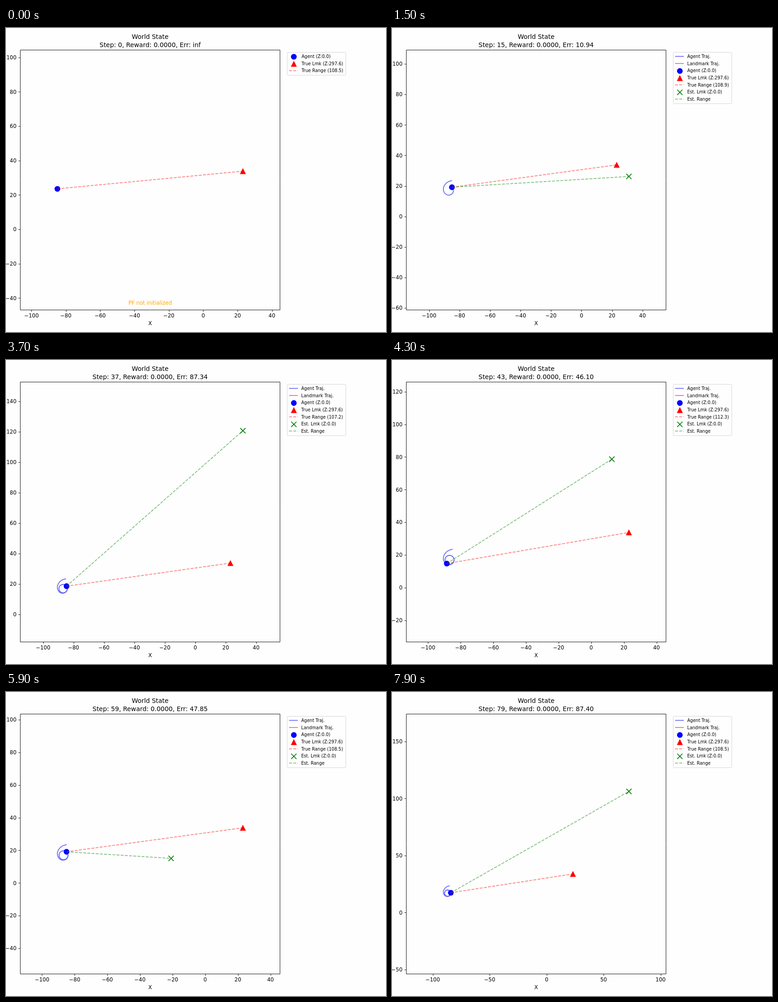
These frames come from a looping animation (837 px wide and 669 px high, 8000 ms). An HTML page with a canvas:

```html
<!DOCTYPE html>
<html lang="en">
<head>
<meta charset="utf-8">
<title>World State</title>
<style>
html, body { margin: 0; width: 100%; height: 100%; overflow: hidden; background: #fefefe; }
canvas { display: block; }
</style>
</head>
<body>
<canvas id="stage" width="837" height="669"></canvas>
<script>
const ctx = document.getElementById('stage').getContext('2d');
const STEPS = 80, STEP_MS = 100;
const BOX = { x: 31.5, y: 48.5, size: 572 };
const MID = { x: BOX.x + BOX.size / 2, y: BOX.y + BOX.size / 2 };
const LANDMARK = [23.1, 33.8];
const RED = 'rgba(255,0,0,.5)', GREEN = 'rgba(0,128,0,.5)';
const BLUE_PATH = 'rgba(0,0,255,.6)', RED_PATH = 'rgba(255,0,0,.6)';
const DASH = [6.4, 2.8];

// step, heading around the orbit centre in degrees
const TURN = [[0, 73.5], [3, 116], [6, 178], [10, 274], [15, 409], [27, 788],
  [37, 1116], [49, 1512], [68, 2152], [79, 2527]];
// step, estimate x, estimate y, error, measured range
const TRACK = [[0, 20, 24, 10.3, 108.5], [15, 31.1, 26.2, 10.94, 108.9],
  [27, 20.8, -9.9, 43.68, 111.5], [37, 31.3, 120.7, 87.34, 107.2],
  [49, -6, 36.6, 29.27, 109.7], [68, -34.3, -4.3, 68.93, 107.6],
  [79, 72.2, 106.2, 87.4, 108.5]];

function lerpKeys(keys, n, value) {
  const i = Math.max(1, keys.findIndex(k => k[0] >= n));
  const a = keys[i - 1], b = keys[i];
  const u = (n - a[0]) / (b[0] - a[0]);
  return value(a) * (1 - u) + value(b) * u;
}

const dist = (a, b) => Math.hypot(a[0] - b[0], a[1] - b[1]);

// A spiral that settles into a circle
function agentAt(n) {
  const deg = lerpKeys(TURN, n, k => k[1]), a = deg * Math.PI / 180;
  const r = 2.8 + 4 * Math.exp(-0.79 * (deg - 73.5) * Math.PI / 180);
  return [-86.85 + r * Math.cos(a), 17 + r * Math.sin(a)];
}

const path = Array.from({ length: STEPS }, (_, n) => agentAt(n));

function text(s, x, y, size, align = 'center', color = '#000') {
  ctx.font = `${size}px "DejaVu Sans", sans-serif`;
  ctx.textAlign = align;
  ctx.fillStyle = color;
  ctx.fillText(s, x, y);
}

function line(points, color, width = 1.74, dash = []) {
  ctx.beginPath();
  points.forEach(p => ctx.lineTo(...p));
  ctx.strokeStyle = color;
  ctx.lineWidth = width;
  ctx.lineJoin = 'round';
  ctx.setLineDash(dash);
  ctx.stroke();
  ctx.setLineDash([]);
}

function dot([x, y]) {
  ctx.beginPath();
  ctx.arc(x, y, 6.3, 0, 7);
  ctx.fillStyle = '#00f';
  ctx.fill();
}

function triangle([x, y]) {
  ctx.beginPath();
  ctx.moveTo(x, y - 6.7);
  ctx.lineTo(x + 6.6, y + 6.4);
  ctx.lineTo(x - 6.6, y + 6.4);
  ctx.fillStyle = '#f00';
  ctx.fill();
}

function cross([x, y]) {
  const d = 5.8;
  line([[x - d, y - d], [x + d, y + d]], '#008000');
  line([[x - d, y + d], [x + d, y - d]], '#008000');
}

function tickStep(span) {
  const raw = span / 9, mag = 10 ** Math.floor(Math.log10(raw));
  return mag * [1, 2, 2.5, 5, 10].find(m => m * mag >= raw);
}

function drawAxes(cx, cy, span, toX, toY) {
  const step = tickStep(span), half = span / 2;
  const bottom = BOX.y + BOX.size;
  const label = v => String(v).replace('-', '\u2212');
  for (let v = Math.ceil((cx - half) / step) * step; v <= cx + half; v += step) {
    const x = Math.round(toX(v)) + 0.5;
    line([[x, bottom], [x, bottom + 4]], '#000', 0.93);
    text(label(v), toX(v), 637, 11.57);
  }
  for (let v = Math.ceil((cy - half) / step) * step; v <= cy + half; v += step) {
    const y = Math.round(toY(v)) + 0.5;
    line([[BOX.x - 4, y], [BOX.x, y]], '#000', 0.93);
    text(label(v), 23, toY(v) + 4.3, 11.57, 'right');
  }
  ctx.strokeStyle = '#000';
  ctx.lineWidth = 0.93;
  ctx.strokeRect(BOX.x, BOX.y, BOX.size, BOX.size);
  text('X', MID.x, 654, 11.57);
}

function drawLegend(started, range) {
  const sample = (color, dash) => y => line([[623.5, y], [642.8, y]], color, 1.74, dash);
  const marker = draw => y => draw([634, y + 0.8]);
  const rows = [
    ['Agent (Z:0.0)', marker(dot)],
    ['True Lmk (Z:297.6)', marker(triangle)],
    [`True Range (${range.toFixed(1)})`, sample(RED, DASH)]
  ];
  if (started) {
    rows.unshift(['Agent Traj.', sample(BLUE_PATH)], ['Landmark Traj.', sample(RED_PATH)]);
    rows.push(['Est. Lmk (Z:0.0)', marker(cross)], ['Est. Range', sample(GREEN, DASH)]);
  }
  ctx.beginPath();
  ctx.roundRect(619.5, 53.5, 129, started ? 113 : 50.5, 2);
  ctx.strokeStyle = '#d6d6d6';
  ctx.lineWidth = 1;
  ctx.stroke();
  rows.forEach(([name, draw], i) => {
    const y = 62.5 + i * 15.65;
    draw(y);
    text(name, started ? 650.3 : 651, y + 3.6, 9.6, 'left');
  });
}

function draw(n) {
  const started = n > 0, agent = path[n];
  const estAt = k => [k[1], k[2]];
  const est = [1, 2].map(i => lerpKeys(TRACK, n, k => k[i]));
  const range = dist(agent, LANDMARK) +
    lerpKeys(TRACK, n, k => k[4] - dist(path[k[0]], LANDMARK));
  const err = dist(est, LANDMARK) +
    lerpKeys(TRACK, n, k => k[3] - dist(estAt(k), LANDMARK));

  // Fit everything seen so far, with a 20% margin
  const trail = path.slice(0, n + 1);
  const seen = [...trail, LANDMARK, ...(started ? [est] : [])];
  const [xs, ys] = [0, 1].map(i => seen.map(p => p[i]));
  const [x0, x1, y0, y1] = [Math.min(...xs), Math.max(...xs), Math.min(...ys), Math.max(...ys)];
  const span = 1.4 * Math.max(x1 - x0, y1 - y0), scale = BOX.size / span;
  const cx = (x0 + x1) / 2, cy = (y0 + y1) / 2;
  const toX = x => MID.x + (x - cx) * scale, toY = y => MID.y - (y - cy) * scale;
  const at = ([x, y]) => [toX(x), toY(y)];

  ctx.fillStyle = '#fefefe';
  ctx.fillRect(0, 0, 837, 669);
  text('World State', MID.x, 24.3, 13.89);
  text(`Step: ${n}, Reward: 0.0000, Err: ${started ? err.toFixed(2) : 'inf'}`, MID.x, 42, 13.89);

  dot(at(agent));
  triangle(at(LANDMARK));
  if (started) {
    cross(at(est));
    line(trail.map(at), BLUE_PATH);
  }
  line([agent, LANDMARK].map(at), RED, 1.74, DASH);
  if (started) line([agent, est].map(at), GREEN, 1.74, DASH);
  else text('PF not initialized', MID.x, 609, 11.57, 'center', '#ffa500');

  drawAxes(cx, cy, span, toX, toY);
  drawLegend(started, range);
}

function tick() {
  draw(Math.floor(performance.now() / STEP_MS) % STEPS);
  requestAnimationFrame(tick);
}
tick();
</script>
</body>
</html>
```
